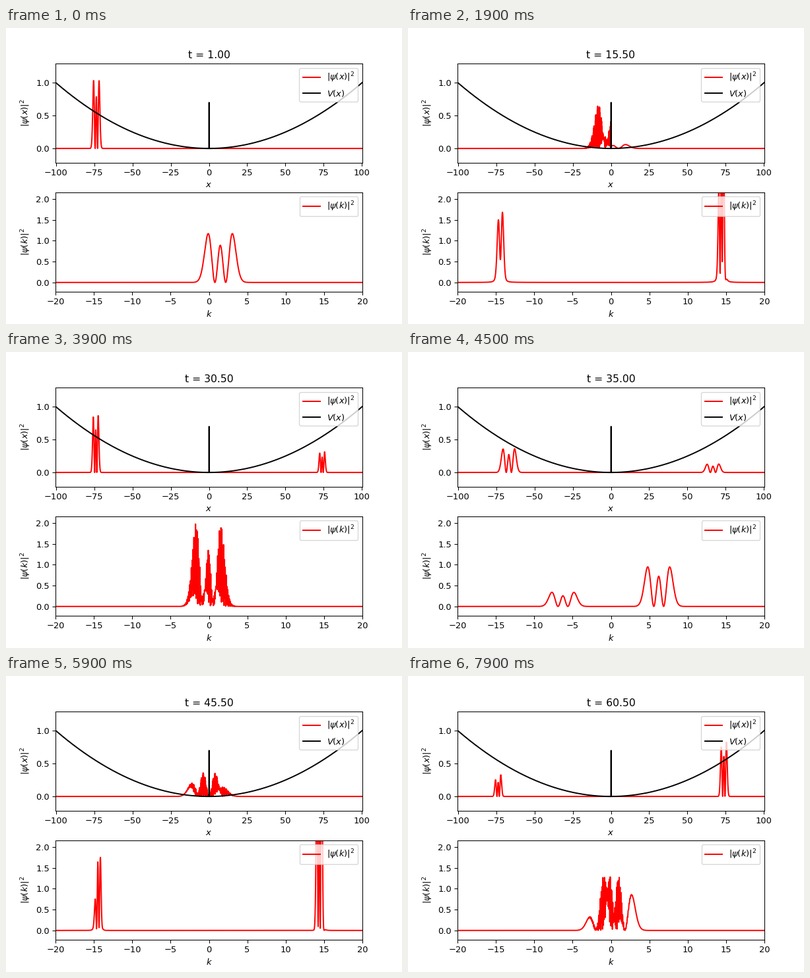
A matplotlib script for the animation above (8000 ms loop, 600 by 450 pixels).

```python
import numpy as np
import matplotlib.pyplot as plt
from matplotlib.animation import FuncAnimation

FRAMES, INTERVAL = 80, 100

# Split-step Fourier solver, hbar = 1
M = 1.9
N, DX, DT = 2048, 0.1, 0.01
STEPS = 50                      # solver steps per half time unit
X0 = -74.0
BARRIER = 77.5

x = DX * (np.arange(N) - N // 2)
k = 2 * np.pi * np.fft.fftfreq(N, DX)
k_sorted = np.fft.fftshift(k)

well = 0.01 * x**2
potential = well.copy()
potential[N // 2 + 1] = BARRIER
half_kick = np.exp(-0.5j * DT * potential)
kick = half_kick**2
drift = np.exp(-0.5j * DT * k**2 / M)


def advance(psi):
    """Evolve psi by STEPS time steps."""
    psi = psi * half_kick
    for step in range(STEPS):
        psi = np.fft.ifft(drift * np.fft.fft(psi))
        psi *= kick if step < STEPS - 1 else half_kick
    return psi


def momentum_density(psi):
    psi_k = np.fft.fftshift(np.fft.fft(psi)) * DX / np.sqrt(2 * np.pi)
    return np.abs(psi_k)**2


def half_units(i):
    """Simulation time of frame i, in halves of a time unit."""
    return 2 + (3 * i + 1) // 2


# Second excited oscillator state, displaced to the left
z = x - X0
psi0 = np.pi**0.25 / np.sqrt(8) * (4 * z**2 - 2) * np.exp(-z**2 / 2)
states = [psi0.astype(complex)]
for _ in range(half_units(FRAMES - 1)):
    states.append(advance(states[-1]))

peak = np.abs(psi0).max()

# 6.4 x 4.8 in at 93.75 dpi is 600 x 450 px
fig, (ax_x, ax_k) = plt.subplots(2, 1, figsize=(6.4, 4.8), dpi=93.75)
fig.subplots_adjust(left=0.125, right=0.9, bottom=0.11, top=0.88, hspace=0.3)

psi_x_line, = ax_x.plot([], [], 'r', label=r'$|\psi(x)|^2$')
shown = well / 100
shown[N // 2 + 1] = 0.7
ax_x.plot(x, shown, 'k', label='$V(x)$')
ax_x.set(xlim=(-100.3, 100.3), ylim=(-0.2 * peak, 1.2 * peak),
         xlabel='$x$', ylabel=r'$|\psi(x)|^2$')
title = ax_x.set_title('')

psi_k_line, = ax_k.plot([], [], 'r', label=r'$|\psi(k)|^2$')
ax_k.set(xlim=(-20, 20), ylim=(-0.2 * peak, 2 * peak),
         xlabel='$k$', ylabel=r'$|\psi(k)|^2$')

for ax in (ax_x, ax_k):
    ax.legend(loc='upper right')


def update(i):
    n = half_units(i)
    psi = states[n]
    psi_x_line.set_data(x, np.abs(psi)**2)
    psi_k_line.set_data(k_sorted, momentum_density(psi))
    title.set_text(f't = {n / 2:.2f}')
    return psi_x_line, psi_k_line, title


anim = FuncAnimation(fig, update, frames=FRAMES, interval=INTERVAL,
                     repeat=True, repeat_delay=0, blit=False)
plt.show()
```
